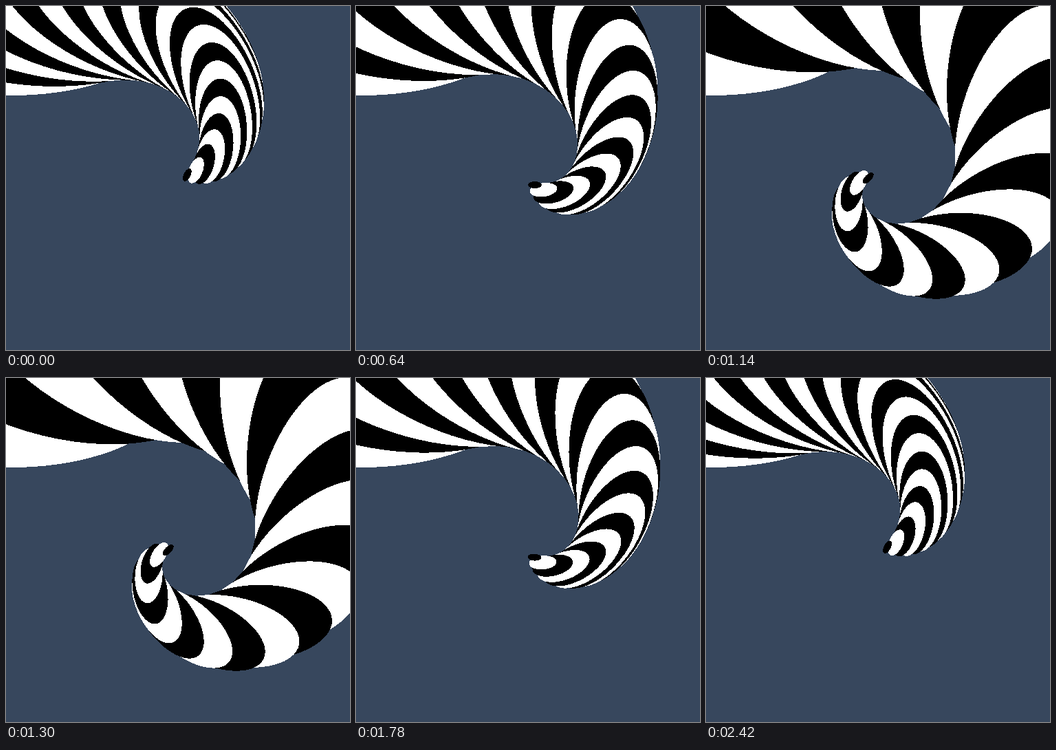
Write an HTML page that moves like this. It is 500 by 500 pixels and loops after 2440 ms.

```html
<!DOCTYPE html>
<html lang="en">
<head>
<meta charset="utf-8">
<title>Striped tail</title>
<style>
  html, body { margin: 0; width: 100%; height: 100%; overflow: hidden; background: #37475d; }
  svg { display: block; width: 100vw; height: 100vh; }
</style>
</head>
<body>
<svg id="stage" viewBox="-250 -250 500 500" shape-rendering="crispEdges"></svg>
<script>
  const LOOP = 2440, STEP = 20, COUNT = 24;
  const stage = document.getElementById('stage');

  // Stacked ellipses, shrinking evenly towards the centre of the stage.
  const rings = Array.from({ length: COUNT }, (_, i) => {
    const el = document.createElementNS('http://www.w3.org/2000/svg', 'ellipse');
    const attrs = { cx: -240, cy: -240, rx: 240, ry: 120, fill: i % 2 ? '#000' : '#fff' };
    for (const key in attrs) el.setAttribute(key, attrs[key]);
    return stage.appendChild(el);
  });

  // Turn between neighbouring rings, in degrees; its inverse is a triangle wave.
  function twist(ms) {
    const spread = 29.5 + Math.abs(ms - LOOP / 2) / STEP;
    return 8 / spread * 180 / Math.PI;
  }

  function draw(ms) {
    const angle = twist(ms);
    rings.forEach((el, i) =>
      el.setAttribute('transform', `rotate(${i * angle}) scale(${1 - i / COUNT})`));
  }

  const start = performance.now();
  function tick() {
    const ms = (performance.now() - start) % LOOP;
    draw(Math.floor(ms / STEP) * STEP);
    requestAnimationFrame(tick);
  }
  tick();
</script>
</body>
</html>
```
